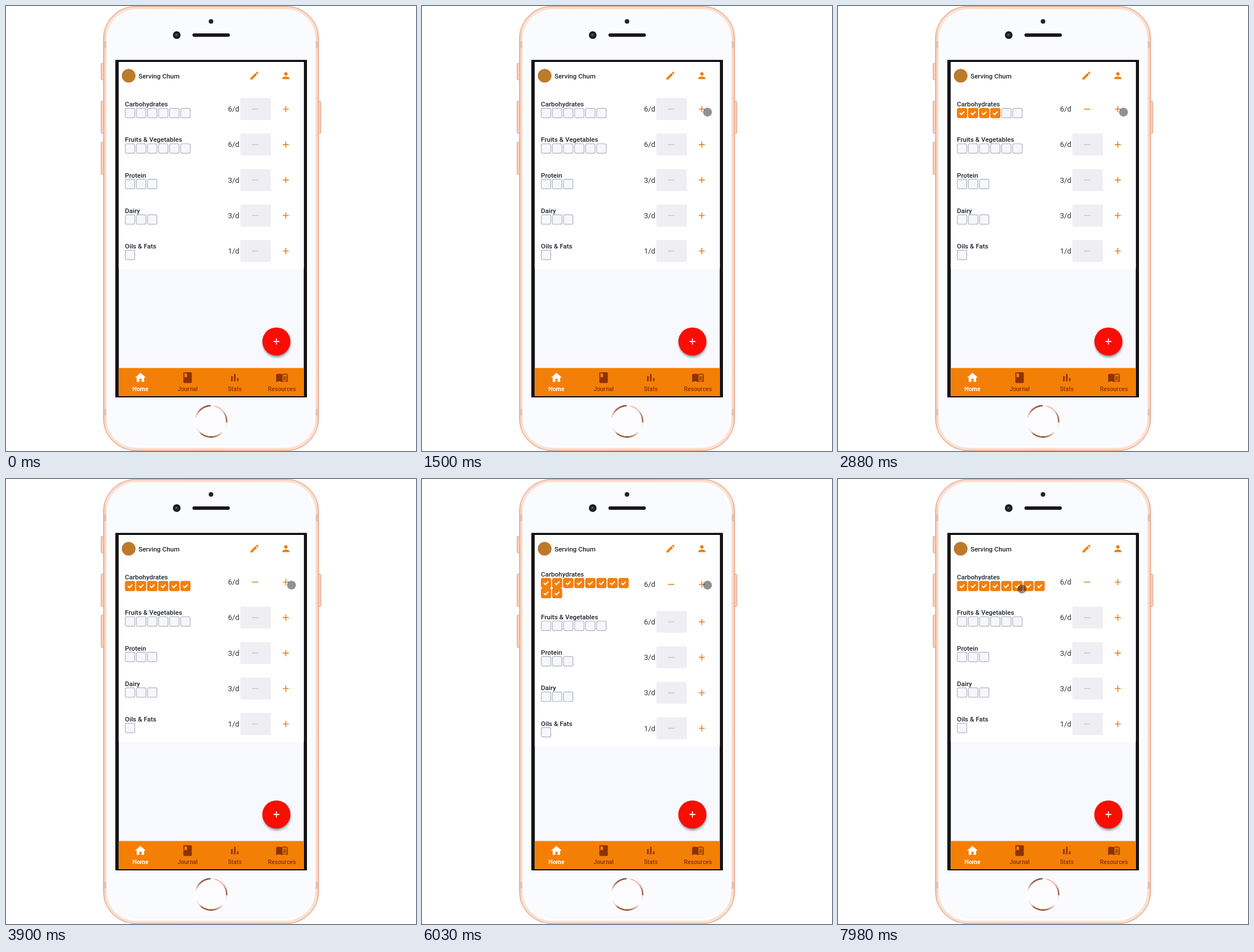
Recreate the animation shown at these times as an HTML page. Size 718 by 780 pixels, loop 8000 ms.

```html
<!DOCTYPE html>
<html lang="en">
<head>
<meta charset="utf-8">
<title>Portion tracker</title>
<style>
  html, body { margin: 0; width: 100%; height: 100%; overflow: hidden; background: #fff; }
  #stage { position: relative; width: 718px; height: 780px; overflow: hidden; }
  svg { position: absolute; inset: 0; display: block; font-family: Roboto, sans-serif; }
  .label { font-size: 11.5px; font-weight: 500; fill: #20232c; }
  .quota { font-size: 13px; fill: #30323a; }
  .tab { font-size: 10.4px; font-weight: 500; text-anchor: middle; }
  .orange { fill: #e9821a; }
  .box { fill: #f7f7fa; stroke: #adb1c3; stroke-width: 1.2; }
  .checked .box { fill: #f38009; stroke: #e87a0b; }
  .tick { fill: none; stroke: #fff; stroke-width: 2; visibility: hidden; }
  .checked .tick { visibility: inherit; }
  .pad { fill: #eeeef3; }
  .minus { fill: #c3cbd8; }
  .active .pad { visibility: hidden; }
  .active .minus { fill: #e9821a; }
  #ring {
    position: absolute; left: 330px; top: 699px; width: 58px; height: 58px; border-radius: 50%;
    background: conic-gradient(#fff 0 8deg, #f3c6b2 16deg 48deg, #a56f58 78deg, #98604a 88deg,
      #fbeee8 98deg, #fff 130deg, #d9a892 148deg, #8f5a45 176deg, #a06a53 215deg,
      #f5ddd2 228deg, #fff 255deg 278deg, #efcdbf 292deg, #a06a52 318deg, #855140 350deg, #a36f5a 358deg, #fff);
    mask: radial-gradient(circle, transparent 25.8px, #000 26.4px);
  }
</style>
</head>
<body>
<div id="stage">
<svg width="718" height="780" viewBox="0 0 718 780">
  <defs>
    <linearGradient id="rim">
      <stop offset="0" stop-color="#f6c2a9"/>
      <stop offset=".012" stop-color="#fde0d2"/>
      <stop offset=".5" stop-color="#fddccb"/>
      <stop offset=".988" stop-color="#fde0d2"/>
      <stop offset="1" stop-color="#f6c2a9"/>
    </linearGradient>
    <filter id="soft" x="-30%" y="-30%" width="160%" height="170%"><feGaussianBlur stdDeviation="2"/></filter>
    <clipPath id="screen"><rect x="197.5" y="98" width="324" height="586"/></clipPath>
  </defs>

  <g fill="#fbd2bf" stroke="#d39b80">
    <rect x="166.5" y="100.5" width="7" height="29" rx="2"/>
    <rect x="166.5" y="166.5" width="7" height="57" rx="2"/>
    <rect x="166.5" y="238.5" width="7" height="57" rx="2"/>
    <rect x="545" y="166.5" width="6.5" height="57" rx="2"/>
  </g>
  <rect x="170.7" y=".7" width="376.8" height="778.6" rx="57" fill="url(#rim)" stroke="#e4ab91" stroke-width="1.4"/>
  <g fill="#dcc3b8">
    <rect x="171" y="62" width="5" height="12"/><rect x="542" y="62" width="5" height="12"/>
    <rect x="171" y="706" width="5" height="12"/><rect x="542" y="706" width="5" height="12"/>
  </g>
  <rect x="176" y="5.5" width="366" height="769" rx="52" fill="#fff" stroke="#f6e8e1"/>
  <rect x="179" y="8.5" width="360" height="763" rx="49" fill="#fafbfe"/>
  <circle cx="359" cy="27" r="4" fill="#24232a"/>
  <rect x="326.5" y="48" width="65.5" height="6" rx="3" fill="#17171c"/>
  <circle cx="299" cy="51" r="6.7" fill="#15161c"/>
  <circle cx="299" cy="51" r="3.2" fill="#263747"/>
  <circle cx="298" cy="50" r="1.2" fill="#59738b"/>
  <circle cx="359" cy="728" r="27" fill="#fcfcff"/>

  <rect x="191.5" y="94.5" width="335.5" height="591.5" fill="#08080a"/>
  <path d="M194.5 96V684.5M524.5 96V684.5" stroke="#292a2d"/>
  <g clip-path="url(#screen)">
    <rect x="197" y="97" width="325" height="588" fill="#f8f9fe"/>
    <rect id="sheet" x="197" y="97" width="325" height="364.5" fill="#fff"/>
    <circle cx="214.8" cy="122.3" r="12" fill="#bd7a2b"/>
    <text class="label" x="232" y="126.5">Serving Chum</text>
    <path class="orange" transform="translate(425.7 112.7) scale(.78)" d="M3 17.25V21h3.75L17.81 9.94l-3.75-3.75zM20.71 7.04a1 1 0 0 0 0-1.41l-2.34-2.34a1 1 0 0 0-1.41 0l-1.83 1.83 3.75 3.75z"/>
    <path class="orange" transform="translate(480.9 112.8) scale(.77)" d="M12 12a4 4 0 1 0 0-8 4 4 0 0 0 0 8zm0 2c-2.67 0-8 1.34-8 4v2h16v-2c0-2.66-5.33-4-8-4z"/>
    <g id="rows"></g>

    <circle cx="474" cy="592" r="23.5" fill="#3b5360" opacity=".65" filter="url(#soft)"/>
    <circle cx="473.5" cy="588" r="24.6" fill="#fb0d02"/>
    <path d="M468.3 588h10.4M473.5 582.8v10.4" stroke="#fff" stroke-width="1.8"/>
    <rect x="197" y="634.5" width="325" height="50" fill="#f47f06"/>
    <g id="tabs"></g>
    <circle id="pointer" r="7.6" fill="#000" fill-opacity=".43" stroke="#000" stroke-opacity=".12"/>
  </g>
</svg>
<div id="ring"></div>
</div>
<script>
const LOOP = 8000, PER_LINE = 8, MAX_BOXES = 10;
const foods = [['Carbohydrates', 6], ['Fruits & Vegetables', 6], ['Protein', 3], ['Dairy', 3], ['Oils & Fats', 1]];
const tabs = [
  ['Home', 235.5, 'M10 20v-6h4v6h5v-8h3L12 3 2 12h3v8z'],
  ['Journal', 318, 'M18 2H6a2 2 0 0 0-2 2v16a2 2 0 0 0 2 2h12a2 2 0 0 0 2-2V4a2 2 0 0 0-2-2zM6 4h5v8l-2.5-1.5L6 12z'],
  ['Stats', 400.7, 'M5 9.2h3V19H5zM10.6 5h2.8v14h-2.8zM16.2 13H19v6h-2.8z'],
  ['Resources', 483.3, 'M12 6C9 4 4 4 1 6v14.5c3-1.7 8-1.7 11 0 3-1.7 8-1.7 11 0V6c-3-2-8-2-11 0zM21 18.3c-2.5-.7-5.5-.4-8 .7V7.5c2.5-1.2 5.5-1.6 8-.7zM14 9.7c2-.8 4-1 6-.6v1.5c-2-.4-4-.2-6 .6zM14 12.5c2-.8 4-1 6-.6v1.5c-2-.4-4-.2-6 .6zM14 15.2c2-.8 4-1 6-.6v1.5c-2-.4-4-.2-6 .6z']
];
const addTaps = [1700, 2050, 2400, 2750, 3150, 3600, 4050, 4450, 4900, 5350];
const removeTaps = [7350, 7650];
const route = [[1000, 532, 200], [1350, 500, 186], [6700, 500, 186], [6900, 500, 200],
  [7200, 437, 187], [7720, 437, 187], [7980, 322, 193]];

const $ = id => document.getElementById(id);
function add(parent, tag, attrs = {}, text = '') {
  const node = document.createElementNS('http://www.w3.org/2000/svg', tag);
  for (const key in attrs) node.setAttribute(key, attrs[key]);
  node.textContent = text;
  return parent.appendChild(node);
}
const move = (node, x, y) => node.setAttribute('transform', `translate(${x} ${y})`);

function makeBox(parent) {
  const box = add(parent, 'g');
  add(box, 'rect', { class: 'box', x: .6, y: .6, width: 16.6, height: 16.6, rx: 2.6 });
  add(box, 'path', { class: 'tick', d: 'M5 8.8l2.7 2.8L13 6.3' });
  return box;
}

// Row coordinates are relative to the centre line of the row's buttons.
const rows = foods.map(([name, quota], i) => {
  const group = add($('rows'), 'g');
  const label = add(group, 'text', { class: 'label', x: 208.3, y: -4.5 }, name);
  const boxes = Array.from({ length: i ? quota : MAX_BOXES }, () => makeBox(group));
  boxes.forEach((box, n) => move(box, 208.3 + n * 19.4, -2));
  add(group, 'text', { class: 'quota', x: 388.7, y: 4.5 }, quota + '/d');
  add(group, 'rect', { class: 'pad', x: 410.5, y: -19.2, width: 53.2, height: 38.4, rx: 2 });
  add(group, 'rect', { class: 'minus', x: 431, y: -.8, width: 10.8, height: 1.6 });
  add(group, 'path', { class: 'orange', d: 'M484.7-.8h4.5v-4.6h1.6V-.8h4.5V.8h-4.5v4.6h-1.6V.8h-4.5z' });
  return { group, label, boxes };
});

tabs.forEach(([name, x, d], i) => {
  const fill = i ? '#8b3308' : '#fff';
  add($('tabs'), 'path', { d, fill, 'fill-rule': 'evenodd', transform: `translate(${x - 11.2} 640.2) scale(.93)` });
  add($('tabs'), 'text', { class: 'tab', x, y: 675, fill, style: i ? '' : 'font-weight:700' }, name);
});

function routeAt(t) {
  const i = route.findIndex(stop => stop[0] > t);
  if (i < 0) return route.at(-1).slice(1);
  if (!i) return null;
  const [t0, x0, y0] = route[i - 1], [t1, x1, y1] = route[i];
  const p = (t - t0) / (t1 - t0);
  return [x0 + (x1 - x0) * p, y0 + (y1 - y0) * p];
}

function draw(t) {
  const passed = taps => taps.filter(time => time <= t).length;
  const count = passed(addTaps) - passed(removeTaps);
  const wrapped = count > PER_LINE;
  const shift = wrapped ? 7.5 : 0;

  $('sheet').setAttribute('height', 364 + shift);
  rows.forEach(({ group }, i) => move(group, 0, 180.7 + i * 62.2 + (i ? shift : wrapped ? 4 : 0)));

  const { group, label, boxes } = rows[0];
  group.setAttribute('class', count ? 'active' : '');
  label.setAttribute('y', wrapped ? -13.7 : -4.5);
  boxes.forEach((box, n) => {
    const line = Math.floor(n / PER_LINE);
    move(box, 208.3 + (n % PER_LINE) * 19.4, (wrapped ? -11.2 : -2) + line * 17.8);
    box.setAttribute('class', n < count ? 'checked' : '');
    box.setAttribute('visibility', n < Math.max(count, foods[0][1]) ? 'visible' : 'hidden');
  });

  const spot = routeAt(t);
  $('pointer').setAttribute('visibility', spot ? 'visible' : 'hidden');
  if (spot) move($('pointer'), ...spot);
}

const start = performance.now();
function tick() {
  draw((performance.now() - start) % LOOP);
  requestAnimationFrame(tick);
}
tick();
</script>
</body>
</html>
```
